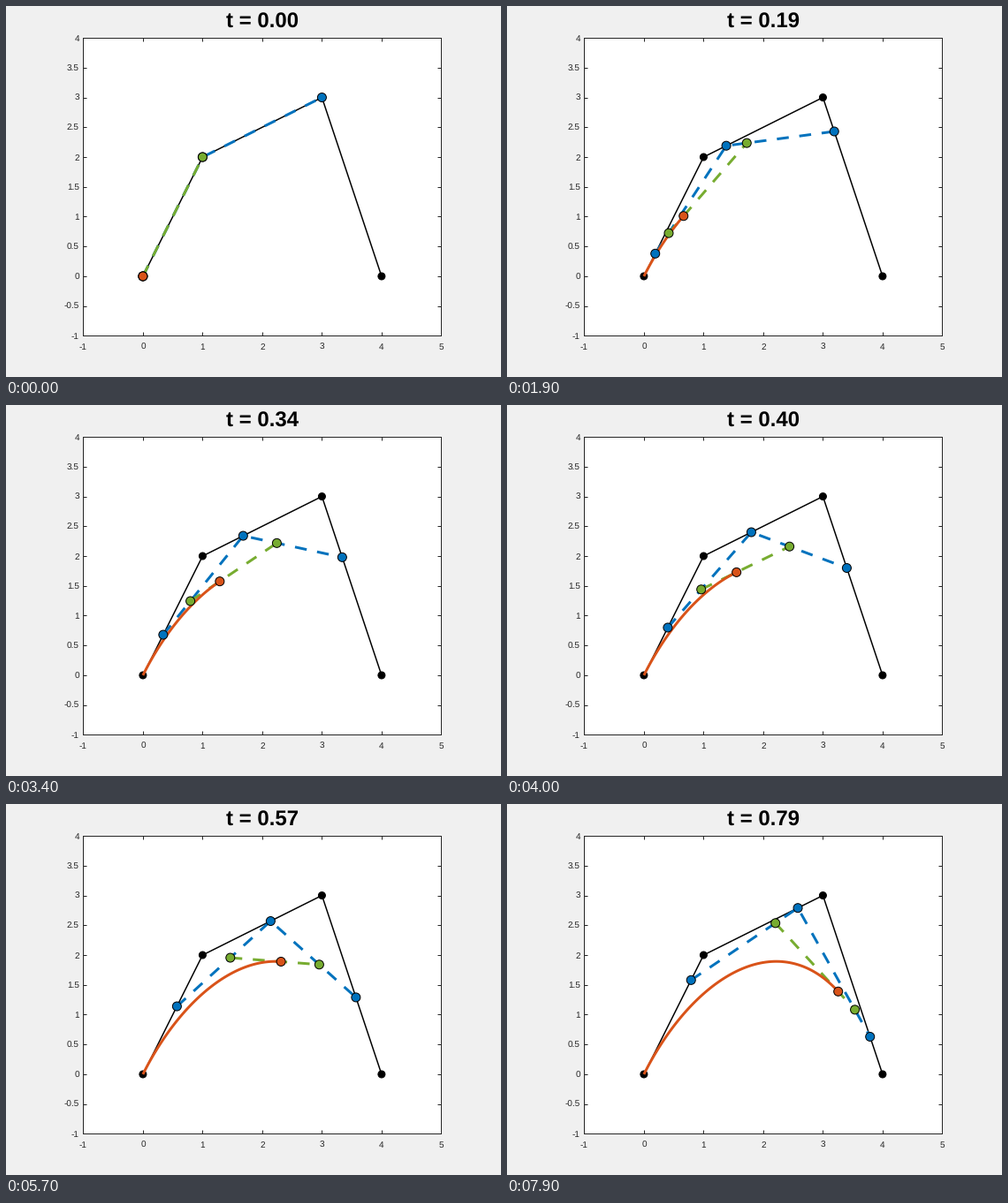
Recreate the animation shown at these times as a matplotlib script. Size 560 by 420 pixels, loop 8000 ms.

```python
import numpy as np
import matplotlib.pyplot as plt
from matplotlib.animation import FuncAnimation
from matplotlib.patches import Circle

W, H, DPI = 560, 420, 80
PX = 72 / DPI  # points per pixel
UNIT = 67.5    # pixels per data unit
BLUE, GREEN, ORANGE = "#0072bd", "#77ac30", "#d95319"
INK = "#262626"
FRAMES, STEP = 80, 0.01

plt.rcParams.update({
    "font.family": "Liberation Sans",
    "axes.unicode_minus": False,
    "text.hinting": "none",
})

CTRL = np.array([[0, 0], [1, 2], [3, 3], [4, 0]], float)


def lerp_chain(pts, t):
    """One de Casteljau step."""
    return (1 - t) * pts[:-1] + t * pts[1:]


def bezier(t):
    pts = CTRL
    while len(pts) > 1:
        pts = lerp_chain(pts, t)
    return pts[0]


CURVE = np.array([bezier(i * STEP) for i in range(FRAMES)])

fig = plt.figure(figsize=(W / DPI, H / DPI), dpi=DPI, facecolor="#f0f0f0")
ax = fig.add_axes([87.4 / W, 46.55 / H, 405 / W, 337.4 / H])
ax.set(xlim=(-1, 5), ylim=(-1, 4))
xticks, yticks = np.arange(-1, 6), np.arange(-1, 4.5, 0.5)
ax.set_xticks(xticks, [f"{v:g}" for v in xticks])
ax.set_yticks(yticks, [f"{v:g}" for v in yticks])
ax.tick_params(direction="in", length=4 * PX, width=PX, color=INK,
               labelcolor=INK, labelsize=10 * PX, top=True, right=True)
ax.tick_params(axis="x", pad=8 * PX)
ax.tick_params(axis="y", pad=4.5 * PX)
for spine in ax.spines.values():
    spine.set(linewidth=PX, color=INK)

title = fig.text(290 / W, 395.5 / H, "", fontsize=24 * PX, weight="bold",
                 ha="center", va="baseline")


def line(color, width, z, style="-"):
    return ax.plot([], [], color=color, lw=width * PX, ls=style, zorder=z,
                   solid_capstyle="butt", dash_capstyle="butt")[0]


def dots(n, color, size, z):
    return [ax.add_patch(Circle((0, 0), size / 2 / UNIT, fc=color, ec="black",
                                lw=PX, zorder=z)) for _ in range(n)]


def place(circles, pts):
    for c, p in zip(circles, pts):
        c.center = tuple(p)


DASH = (0, (4.5, 4))
frame_line = line("black", 1.5, 3)
frame_line.set_data(*CTRL.T)
place(dots(4, "black", 8, 4), CTRL)

blue_line = line(BLUE, 3, 5, DASH)
green_line = line(GREEN, 3, 6, DASH)
trace = line(ORANGE, 3, 7)
blue_dots = dots(3, BLUE, 10, 8)
green_dots = dots(2, GREEN, 10, 9)
tip = dots(1, ORANGE, 10, 10)


def update(i):
    t = i * STEP
    quad = lerp_chain(CTRL, t)
    seg = lerp_chain(quad, t)
    blue_line.set_data(*quad.T)
    green_line.set_data(*seg.T)
    trace.set_data(*CURVE[:i + 1].T)
    place(blue_dots, quad)
    place(green_dots, seg)
    place(tip, CURVE[i:i + 1])
    title.set_text(f"t = {t:.2f}")
    return [blue_line, green_line, trace, title, *blue_dots, *green_dots, *tip]


anim = FuncAnimation(fig, update, frames=FRAMES, interval=100,
                     repeat=True, repeat_delay=0, blit=False)
plt.show()
```
